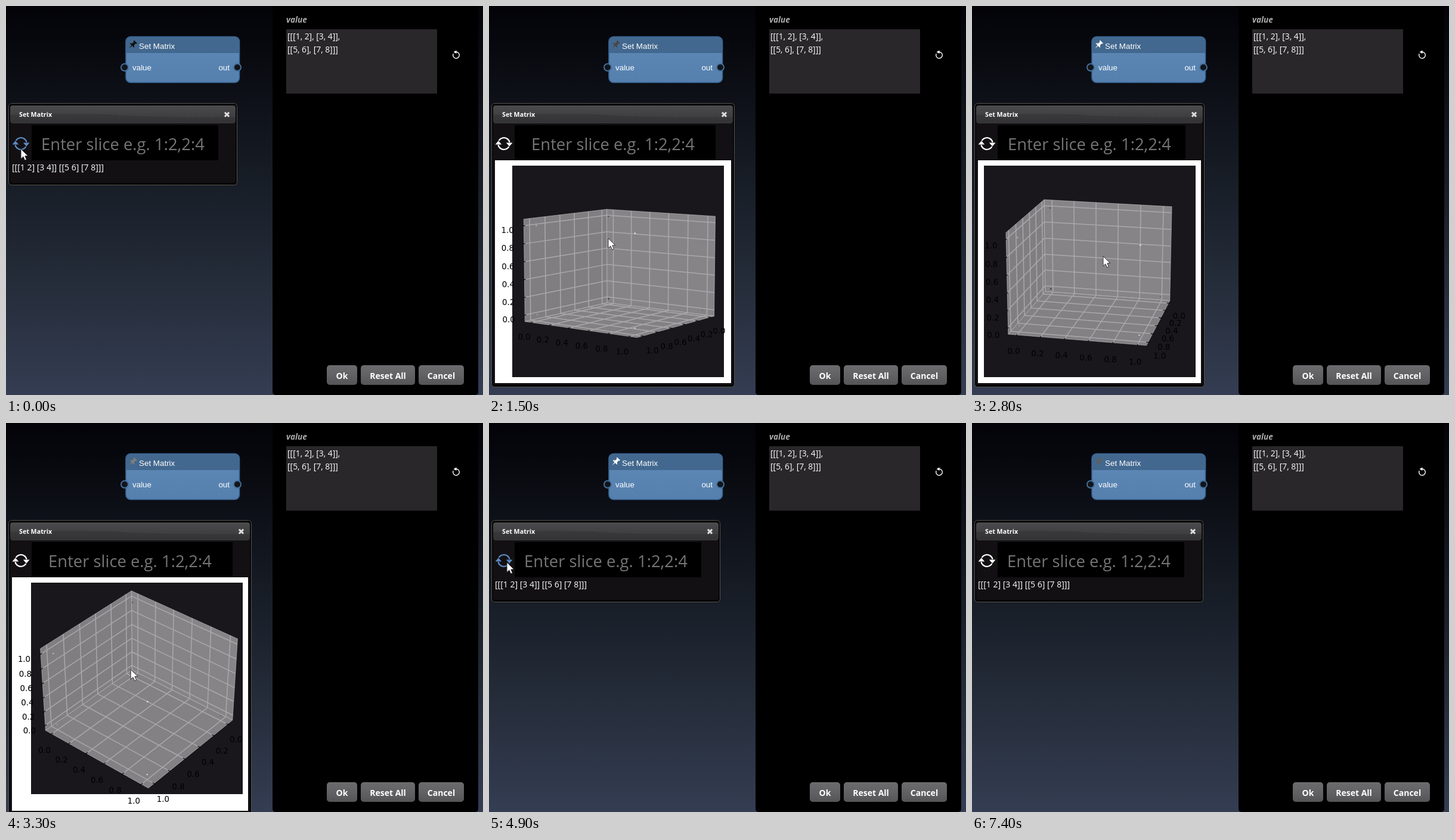
An HTML page with a canvas that plays this animation: 800 px wide and 653 px high, repeating every 7500 ms.

```html
<!DOCTYPE html>
<html>
<head>
<meta charset="utf-8">
<style>
  html, body { margin: 0; width: 100%; height: 100%; overflow: hidden; background: #000; }
  canvas { display: block; }
</style>
</head>
<body>
<canvas id="stage" width="800" height="653"></canvas>
<script>
const g = document.getElementById('stage').getContext('2d');
const UI = '"Open Sans", "Noto Sans", sans-serif';
const ARIAL = '"Liberation Sans", Arial, sans-serif';
const LOOP = 7500, STEP = 100, PLOT_ON = 300, PLOT_OFF = 4800;

// time, x, y of the pointer tip
const POINTER = [[0, 25, 240], [200, 25, 240], [700, 128, 326], [1000, 165, 415], [2000, 235, 365],
  [2800, 220, 420], [4000, 194, 405], [4500, 30, 234], [5700, 30, 234], [6400, 478, 219]];
// time, elevation, azimuth, roll of the camera
const CAMERA = [[0, 30, 45, 15], [1000, 30, 45, 15], [1500, 8, 36, 0], [2000, -6, 23, 0],
  [2800, 17, 13, 0], [3300, 37, 40, 0], [4000, 39, 64.5, 0]];

function track(keys, t) {
  const i = keys.findIndex(k => k[0] > t);
  if (i < 0) return keys[keys.length - 1].slice(1);
  const a = keys[i - 1], b = keys[i], p = (t - a[0]) / (b[0] - a[0]);
  return a.slice(1).map((v, n) => v + (b[n + 1] - v) * p);
}

function shade(y0, y1, ...colors) {
  const s = g.createLinearGradient(0, y0, 0, y1);
  colors.forEach((c, i) => s.addColorStop(i / (colors.length - 1), c));
  return s;
}

function box(x0, y0, x1, y1, r, fill, stroke, width = 1) {
  g.beginPath();
  g.roundRect(x0, y0, x1 - x0, y1 - y0, r);
  if (fill) { g.fillStyle = fill; g.fill(); }
  if (stroke) { g.strokeStyle = stroke; g.lineWidth = width; g.stroke(); }
}

function text(s, x, y, font, color, align = 'left') {
  g.font = font;
  g.fillStyle = color;
  g.textAlign = align;
  g.fillText(s, x, y);
}

function path(points, close) {
  g.beginPath();
  points.forEach(p => g.lineTo(p[0], p[1]));
  if (close) g.closePath();
}

function line(...points) { path(points); g.stroke(); }

function drawPin(t) {
  const phase = t % 2000 / 1000;
  const ease = x => 1 - (1 - x) ** 2.2;
  const w = phase < 1 ? ease(phase) : 1 - ease(phase - 1);
  const c = Math.round(18 + 237 * w);
  g.save();
  g.translate(212.5, 65);
  g.rotate(Math.PI / 4);
  g.fillStyle = `rgb(${c},${c},${c})`;
  path([[-3.5, -7], [3.5, -7], [3.5, -5.5], [2, -4.5], [2.3, -1], [4.8, 1], [4.8, 2], [0.8, 2],
    [0, 8.5], [-0.8, 2], [-4.8, 2], [-4.8, 1], [-2.3, -1], [-2, -4.5], [-3.5, -5.5]], true);
  g.fill();
  g.restore();
}

function drawNode(t) {
  box(201, 51.5, 391.5, 128.5, 8, shade(79, 129, '#5b86b4', '#5580ae'));
  box(201, 51.5, 391.5, 79, [8, 8, 0, 0], '#43688f');
  box(201, 51.5, 391.5, 128.5, 8, null, '#3a6593', 1.6);
  for (const x of [199, 388]) {
    g.beginPath();
    g.arc(x, 103, 6, 0, 7);
    g.fillStyle = '#12151a';
    g.fill();
    g.strokeStyle = '#44709c';
    g.lineWidth = 2;
    g.stroke();
  }
  const font = '13.4px ' + ARIAL;
  text('Set Matrix', 223, 72, font, '#fff');
  text('value', 212, 108, font, '#fff');
  text('out', 375, 108, font, '#fff', 'right');
  drawPin(t);
}

function drawPanel() {
  box(447, -9, 792, 653, 5, '#000');
  text('value', 470, 28, `italic bold 13.6px ${UI}`, '#adacaf');
  box(470, 39, 723, 147, 0, '#29272a');
  text('[[[1, 2], [3, 4]],', 472, 56, '13.9px ' + UI, '#fff');
  text('[[5, 6], [7, 8]]]', 472, 77.5, '13.9px ' + UI, '#fff');

  g.strokeStyle = g.fillStyle = '#fff';
  g.lineWidth = 1.4;
  g.beginPath();
  g.arc(755, 82.5, 5.3, -1.7, 3.6);
  g.stroke();
  path([[750.5, 77.2], [755.5, 74.5], [755.5, 80]], true);
  g.fill();

  for (const [label, x0, x1] of [['Ok', 538, 589], ['Reset All', 595, 686], ['Cancel', 692, 768]]) {
    box(x0, 603, x1, 636, 5, shade(603, 636, '#6c6b6e', '#626164', '#555457'));
    text(label, (x0 + x1) / 2, 625.5, 'bold 14px ' + UI, '#fff', 'center');
  }
}

function drawSync(hover) {
  g.save();
  g.translate(25, 231);
  g.strokeStyle = g.fillStyle = hover ? '#5a8abf' : '#fff';
  g.lineWidth = 2.2;
  for (let i = 0; i < 2; i++) {
    g.beginPath();
    g.arc(0, 0, 9.8, Math.PI * 1.17, Math.PI * 1.93);
    g.stroke();
    path([[3.8, -1.5], [14.5, -1.5], [9.2, 4.8]], true);
    g.fill();
    g.rotate(Math.PI);
  }
  g.restore();
}

function drawWindow(right, bottom, hover) {
  box(4.5, 163.5, right - 0.5, bottom - 0.5, 5, '#050506', '#55544f');
  box(7, 197, right - 3, bottom - 4, [0, 0, 3, 3], '#121013');
  box(7, 167, right - 3, 197, 4, shade(167, 197, '#4b4a4c', '#414042', '#3b3a3c'));
  g.fillStyle = 'rgba(0,0,0,.13)';
  g.beginPath();
  g.moveTo(right - 3, 186);
  g.quadraticCurveTo(right * 0.55, 187, right * 0.45, 182);
  g.quadraticCurveTo(right * 0.2, 180, 7, 183);
  g.lineTo(7, 196);
  g.lineTo(right - 3, 196);
  g.fill();
  text('Set Matrix', 22, 186, 'bold 10.7px ' + UI, '#fff');

  g.strokeStyle = '#dcdcdc';
  g.lineWidth = 3;
  const x = right - 17.5;
  line([x - 3.6, 178.6], [x + 3.6, 185.8]);
  line([x + 3.6, 178.6], [x - 3.6, 185.8]);

  box(43, 200, right - 32, 259, 0, '#000');
  text('Enter slice e.g. 1:2,2:4', (right + 4) / 2, 242, '27.4px ' + UI, '#757575', 'center');
  drawSync(hover);
}

// Perspective view of the unit box; screen x is relative to the dark square.
function makeView([elev, azim, roll]) {
  const [e, a, o] = [elev, azim, roll].map(v => v * Math.PI / 180);
  const { sin, cos } = Math;
  const eye = [cos(e) * cos(a), cos(e) * sin(a), sin(e)];
  const r0 = [-sin(a), cos(a), 0];
  const u0 = [-sin(e) * cos(a), -sin(e) * sin(a), cos(e)];
  const r = r0.map((v, i) => v * cos(o) - u0[i] * sin(o));
  const u = u0.map((v, i) => v * cos(o) + r0[i] * sin(o));
  const dot = (p, q) => p[0] * q[0] + p[1] * q[1] + p[2] * q[2];
  const size = [1.143, 1.143, 0.857];
  return {
    eye,
    project(p) {
      const q = p.map((v, i) => (v - 0.5) / 1.1 * size[i]);
      const k = 1919 / (10 - dot(q, eye));
      return [182 + dot(q, r) * k, 440.7 - dot(q, u) * k];
    }
  };
}

const TICKS = [0, 0.2, 0.4, 0.6, 0.8, 1];
const LOW = -0.073, HIGH = 1.073;

function layoutPlot(view) {
  const back = view.eye.map(v => v < 0 ? HIGH : LOW);
  const front = back.map(v => LOW + HIGH - v);
  const labels = [], marks = [];
  for (let axis = 0; axis < 3; axis++) {
    const edge = back.slice();
    const swap = axis === 0 ? 1 : 0;
    edge[swap] = front[swap];
    const shift = (v, d) => v + (v > 0.5 ? d : -d);
    for (const v of TICKS) {
      const at = d => view.project(edge.map((c, i) => i === axis ? v : shift(c, d)));
      const tickEnd = d => view.project(edge.map((c, i) => i === axis ? v : i === swap ? shift(c, d) : c));
      const [x, y] = at(0.095);
      labels.push([v.toFixed(1), x, y + 7]);
      marks.push([tickEnd(-0.016), tickEnd(0.014)]);
    }
  }
  const xs = labels.map(l => l[1]), ys = labels.map(l => l[2]);
  return {
    back, labels, marks,
    left: Math.round(19.6 + Math.max(0, 11.2 - Math.min(...xs))),
    width: Math.round(Math.max(355, Math.max(...xs) + 11.2) + 8.7),
    bottom: Math.round(Math.max(623, Math.max(...ys) + 6.5) + 9.8)
  };
}

function drawPlot(view, plot) {
  const { project } = view;
  box(10, 259, plot.left + plot.width, plot.bottom, 0, '#fff');
  g.save();
  g.translate(plot.left, 0);
  box(0, 268, 355, 623, 0, '#19171b');

  for (let axis = 0; axis < 3; axis++) {
    const m = (axis + 1) % 3, n = (axis + 2) % 3;
    const at = (p, q) => {
      const c = [];
      c[axis] = plot.back[axis];
      c[m] = p;
      c[n] = q;
      return project(c);
    };
    path([at(LOW, LOW), at(HIGH, LOW), at(HIGH, HIGH), at(LOW, HIGH)], true);
    g.fillStyle = ['#868487', '#807e81', '#838184'][axis];
    g.fill();
    g.strokeStyle = 'rgba(225,225,225,.45)';
    g.lineWidth = 1;
    g.stroke();
    g.strokeStyle = '#a9a8aa';
    g.lineWidth = 1.5;
    for (const v of TICKS) {
      line(at(v, LOW), at(v, HIGH));
      line(at(LOW, v), at(HIGH, v));
    }
  }

  g.strokeStyle = '#000';
  g.lineWidth = 1.1;
  plot.marks.forEach(m => line(...m));
  for (let i = 0; i < 8; i++) {
    const [x, y] = project([i >> 2, i >> 1 & 1, i & 1]);
    const c = Math.round(45 + i * 30);
    g.fillStyle = `rgb(${c},${c},${c})`;
    g.fillRect(x - 1, y - 1, 2, 2);
  }
  for (const [s, x, y] of plot.labels) {
    text(s, x, y + 4.8, '13.34px "DejaVu Sans", sans-serif', '#000', 'center');
  }
  g.restore();
}

function drawPointer(x, y) {
  g.save();
  g.translate(x, y);
  path([[0, 0], [0, 16.5], [3.9, 12.9], [6.6, 19], [9.4, 17.8], [6.8, 11.9], [11.8, 11.6]], true);
  g.fillStyle = '#fff';
  g.fill();
  g.strokeStyle = '#222';
  g.lineWidth = 0.9;
  g.stroke();
  g.restore();
}

function draw(t) {
  g.fillStyle = shade(0, 653, '#030308', '#12161e', '#222a36', '#343d52');
  g.fillRect(0, 0, 800, 653);
  drawNode(t);
  drawPanel();

  const [x, y] = track(POINTER, t);
  const hover = Math.hypot(x - 25, y - 231) < 14;
  if (t >= PLOT_ON && t < PLOT_OFF) {
    const view = makeView(track(CAMERA, t));
    const plot = layoutPlot(view);
    drawWindow(plot.left + plot.width + 6, plot.bottom + 7, hover);
    drawPlot(view, plot);
  } else {
    drawWindow(388, 301, hover);
    text('[[[1 2] [3 4]] [[5 6] [7 8]]]', 10, 275.5, '14px ' + UI, '#fff');
  }
  if (t < 7300) drawPointer(x, y);
}

const start = performance.now();
function tick() {
  const t = (performance.now() - start) % LOOP;
  draw(Math.floor(t / STEP) * STEP);
  requestAnimationFrame(tick);
}
tick();
</script>
</body>
</html>
```
